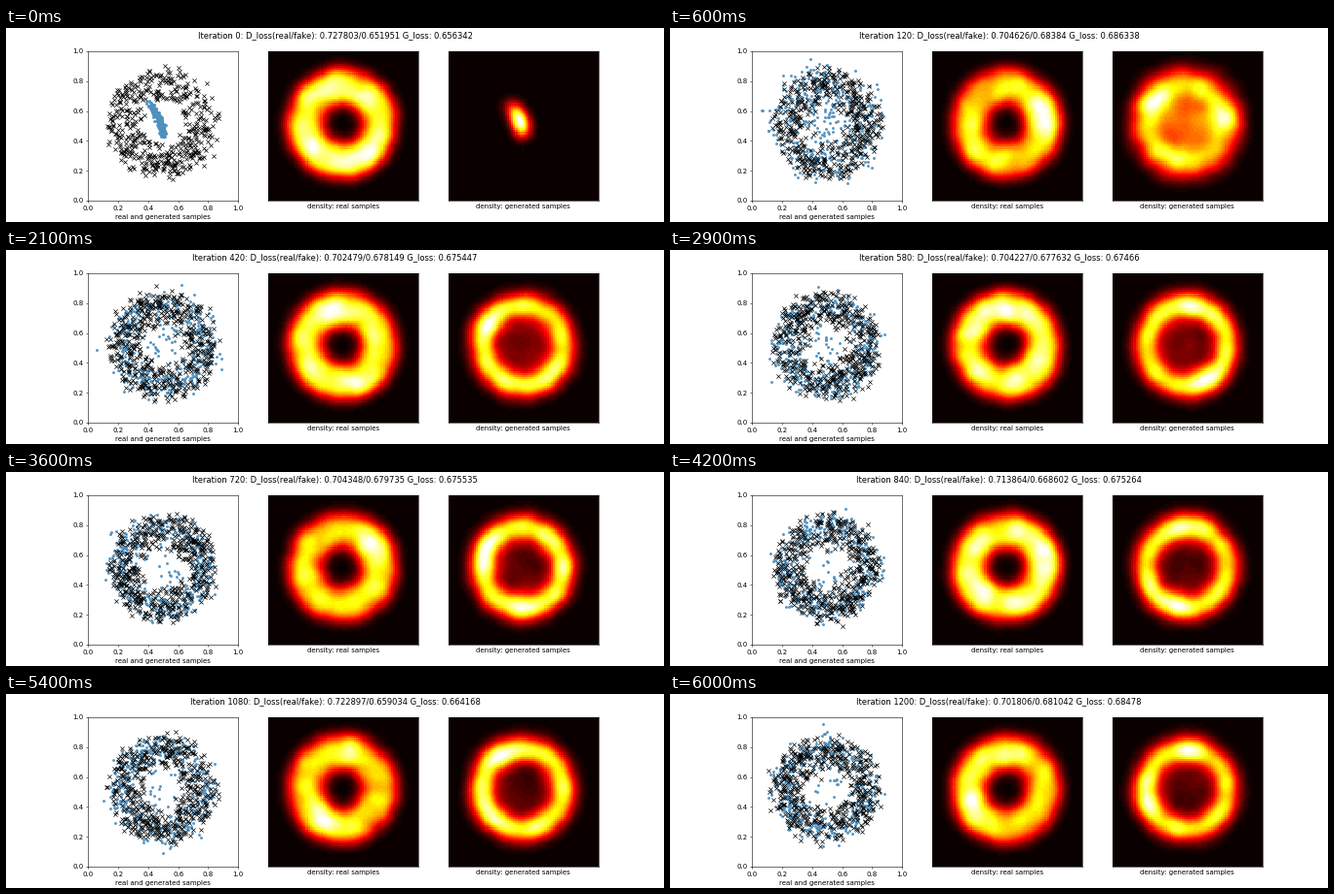
Recreate the animation shown at these times as a matplotlib script. Size 675x200 px, loop 6100 ms.

```python
import numpy as np
import matplotlib.pyplot as plt
from matplotlib.animation import FuncAnimation

FRAMES, INTERVAL = 61, 100
SHOWN, DRAWN = 512, 4000      # points plotted / points behind the densities
GRID, BANDWIDTH = 72, 0.042
CENTER = np.array([0.493, 0.518])


def smoothstep(t):
    t = np.clip(t, 0, 1)
    return t * t * (3 - 2 * t)


def ring_angles(rng, peaks, share):
    """Uniform angles with a share of them gathered around the peaks."""
    angles = rng.uniform(0, 360, DRAWN)
    near = rng.choice(peaks, DRAWN) + rng.normal(0, 16, DRAWN)
    return np.radians(np.where(rng.random(DRAWN) < share, near, angles))


def disk_radius(rng, inner, outer):
    """Radii that spread points evenly over an annulus."""
    return np.sqrt(rng.uniform(inner ** 2, outer ** 2, DRAWN))


def polar(radius, angle):
    return CENTER + np.column_stack((radius * np.cos(angle),
                                     radius * np.sin(angle)))


def real_samples(rng):
    angle = ring_angles(rng, rng.uniform(0, 360, 3), 0.05)
    radius = disk_radius(rng, 0.15, 0.355) + rng.normal(0, 0.023, DRAWN)
    return polar(radius, angle)


def initial_arc(rng):
    """Thin curved streak produced by the untrained generator."""
    t = rng.beta(2, 2, DRAWN)[:, None]
    a, b, c = np.array([[0.39, 0.67], [0.51, 0.53], [0.49, 0.42]])
    curve = (1 - t) ** 2 * a + 2 * t * (1 - t) * b + t ** 2 * c
    return curve + rng.normal(0, 0.009, (DRAWN, 2))


def generated_samples(step, rng):
    # One dense spot sways near the top, the other drifts clockwise
    peaks = (115 + 32 * np.sin(2 * np.pi * (step - 17.5) / 15),
             350 - 3.2 * (step - 12))
    angle = ring_angles(rng, peaks, 0.07)
    burst = np.exp(-((step - 4) / 2) ** 2)
    radius = 0.283 + 0.09 * burst
    radius = radius + (0.045 + 0.035 * burst) * rng.normal(0, 1, DRAWN)
    fill = 0.11 + 0.42 * np.exp(-step / 12)
    inside = rng.random(DRAWN) < fill
    radius = np.where(inside, disk_radius(rng, 0, 0.28), radius)
    mix = smoothstep(step / 7)
    return (1 - mix) * initial_arc(rng) + mix * polar(radius, angle)


def density(points):
    centers = (np.arange(GRID) + 0.5) / GRID
    kx, ky = (np.exp(-((centers[:, None] - v) / BANDWIDTH) ** 2 / 2)
              for v in points.T)
    return ky @ kx.T


def losses(rng):
    """The two discriminator losses mirror each other; G follows the fake."""
    d_real = 0.707 + rng.normal(0, 0.022)
    d_fake = 1.383 - d_real + rng.normal(0, 0.002)
    return d_real, d_fake, d_fake + rng.normal(0.002, 0.004)


fig, (ax, ax_real, ax_gen) = plt.subplots(1, 3, figsize=(13.5, 4), dpi=50)
fig.subplots_adjust(left=0.125, right=0.9, bottom=0.11, top=0.88, wspace=0.2)
title = fig.suptitle("", fontsize=12, y=0.985)

gen_dots = ax.scatter([], [], marker=".", s=36, color="#5090be")
real_marks = ax.scatter([], [], marker="x", s=36, color="black", linewidth=1)
ax.set(xlim=(0, 1), ylim=(0, 1), xlabel="real and generated samples")


def heatmap(axes, label):
    axes.set(xticks=[], yticks=[], xlabel=label)
    return axes.imshow(np.zeros((GRID, GRID)), origin="lower", aspect="auto",
                       cmap=plt.get_cmap("hot", 48), interpolation="nearest")


real_map = heatmap(ax_real, "density: real samples")
gen_map = heatmap(ax_gen, "density: generated samples")


def update(step):
    rng = np.random.default_rng(100 + step)
    real, gen = real_samples(rng), generated_samples(step, rng)
    for points, marks, image in ((real, real_marks, real_map),
                                 (gen, gen_dots, gen_map)):
        marks.set_offsets(points[:SHOWN])
        values = density(points)
        image.set_data(values)
        image.set_clim(0, values.max())
    d_real, d_fake, g = losses(rng)
    title.set_text(f"Iteration {20 * step}: D_loss(real/fake): "
                   f"{d_real:.6g}/{d_fake:.6g} G_loss: {g:.6g}")
    return title, gen_dots, real_marks, real_map, gen_map


anim = FuncAnimation(fig, update, frames=FRAMES, interval=INTERVAL, repeat=True)
plt.show()
```
